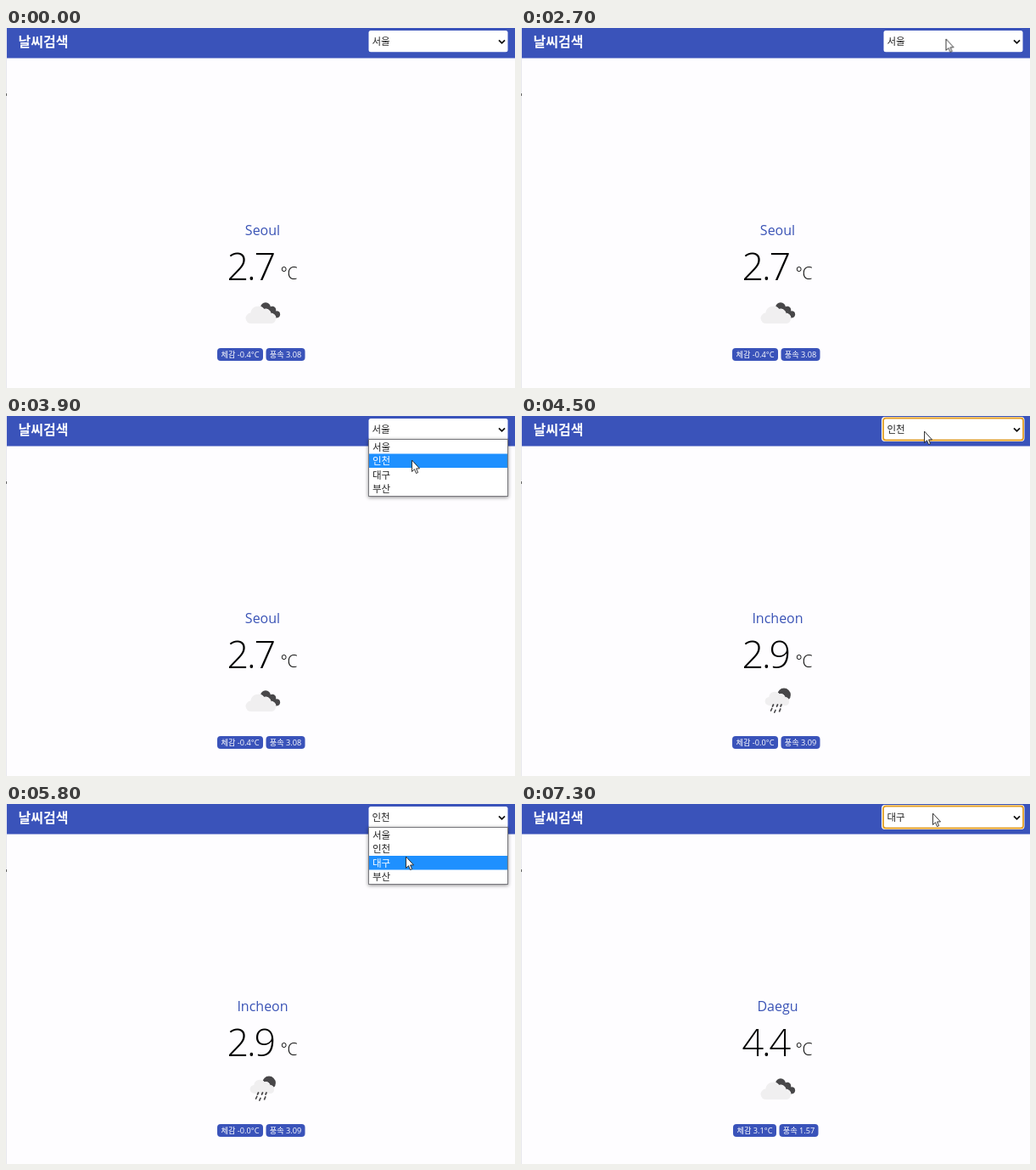
Animation, 600 px wide and 424 px high, one loop 8 s. Source, as an HTML page:

```html
<!DOCTYPE html>
<html lang="ko">
<head>
<meta charset="utf-8">
<title>날씨검색</title>
<style>
  html, body { margin: 0; width: 100%; height: 100%; overflow: hidden; background: #fefdff; }
  svg { display: block; width: 600px; height: 424px; }
  text { font-family: "Open Sans", "Noto Sans CJK KR", "Noto Sans CJK", sans-serif; }

  .title { font-size: 16px; font-weight: 700; fill: #fff; }
  .field { font-size: 11.5px; fill: #222; }
  .on { fill: #fff; }
  .city { font-size: 16px; fill: #3a53b6; text-anchor: middle; }
  .temp { font-size: 45px; font-weight: 350; letter-spacing: -2.2px; }
  .unit { font-size: 19.5px; font-weight: 350; letter-spacing: -.4px; }
  .chip { font-size: 9.2px; fill: #fff; text-anchor: middle; }
  .popup { filter: drop-shadow(0 1px 2px rgba(0, 0, 0, .45)); }

  /* Everything shares one 8 s clock; switches are hard cuts. */
  .anim { animation: 8s step-end infinite; }
  .pick1 { animation-name: pick1; }
  .pick2 { animation-name: pick2; }
  .pick3 { animation-name: pick3; }
  .view1 { animation-name: view1; }
  .view2 { animation-name: view2; }
  .view3 { animation-name: view3; }
  .row1 { animation-name: row1; }
  .row2 { animation-name: row2; }
  .row3 { animation-name: row3; }
  .open { animation-name: open; }
  .focus { animation-name: focus; }
  .cursor { animation-name: cursor; }

  /* selected label */
  @keyframes pick1 { 0% { opacity: 1 } 51.25%, 100% { opacity: 0 } }
  @keyframes pick2 { 0% { opacity: 0 } 51.25% { opacity: 1 } 78.75%, 100% { opacity: 0 } }
  @keyframes pick3 { 0% { opacity: 0 } 78.75%, 100% { opacity: 1 } }

  /* weather panel, a moment after the selection */
  @keyframes view1 { 0% { opacity: 1 } 53.75%, 100% { opacity: 0 } }
  @keyframes view2 { 0% { opacity: 0 } 53.75% { opacity: 1 } 81.25%, 100% { opacity: 0 } }
  @keyframes view3 { 0% { opacity: 0 } 81.25%, 100% { opacity: 1 } }

  /* highlighted option */
  @keyframes row1 { 0% { opacity: 1 } 45%, 100% { opacity: 0 } }
  @keyframes row2 { 0% { opacity: 0 } 45% { opacity: 1 } 71.25%, 100% { opacity: 0 } }
  @keyframes row3 { 0% { opacity: 0 } 71.25%, 100% { opacity: 1 } }

  @keyframes open {
    0% { opacity: 0 } 35% { opacity: 1 } 51.25% { opacity: 0 }
    63.75% { opacity: 1 } 78.75%, 100% { opacity: 0 }
  }
  @keyframes focus {
    0% { opacity: 0 } 51.25% { opacity: 1 }
    63.75% { opacity: 0 } 78.75%, 100% { opacity: 1 }
  }

  /* the pointer advances every 100 ms */
  @keyframes cursor {
    0%     { transform: translate(506px, -24px) }
    22.5%  { transform: translate(506px, -14.5px); animation-timing-function: steps(3) }
    26.25% { transform: translate(502px, 12px) }
    32.5%  { transform: translate(502px, 12px); animation-timing-function: steps(6) }
    40%    { transform: translate(493px, 17px); animation-timing-function: steps(3) }
    43.75% { transform: translate(486px, 34px); animation-timing-function: steps(2) }
    46.25% { transform: translate(480px, 57px); animation-timing-function: steps(2) }
    48.75% { transform: translate(478px, 52px) }
    50%    { transform: translate(478px, 52px); animation-timing-function: steps(5) }
    56.25% { transform: translate(475px, 18px) }
    66.25% { transform: translate(475px, 18px); animation-timing-function: steps(5) }
    72.5%  { transform: translate(471px, 62px) }
    76.25% { transform: translate(467px, 64px) }
    77.5%  { transform: translate(467px, 64px); animation-timing-function: steps(9) }
    88.75% { transform: translate(478px, 20px); animation-timing-function: steps(2) }
    91.25%, 100% { transform: translate(485px, 11px) }
  }
</style>
</head>
<body>
<svg viewBox="0 0 600 424">
  <defs>
    <path id="cloud" d="M289 348a6.2 6.2 0 0 1-.6-12.4A8.6 8.6 0 0 1 304 331.500A6 6 0 0 1 312 336.200A6 6 0 0 1 313.500 348Z"
          fill="#f0eff0" stroke="#fefdff" stroke-width="1.2" paint-order="stroke"/>
    <g id="cloudy">
      <g fill="#484749">
        <circle cx="306" cy="329.200" r="6"/>
        <circle cx="314" cy="332" r="4.300"/>
        <circle cx="319" cy="337.300" r="4.100"/>
        <path d="M306 330h9l4 11.400h-10z"/>
      </g>
      <use href="#cloud"/>
    </g>
    <g id="rainy">
      <circle cx="310" cy="328.500" r="7.900" fill="#484749"/>
      <use href="#cloud" transform="translate(61.600 62.500) scale(.8)"/>
      <path d="M297.500 340l-1 2M302.500 340l-1 2M307 340l-1 2M295.800 344.500l-1.200 2.500M300 346.500l-1.200 2.500M305.800 345l-1.200 2.800"
            stroke="#484749" stroke-width="1.700" stroke-linecap="round"/>
    </g>
  </defs>

  <rect width="600" height="424" fill="#fefdff"/>
  <rect width="1" height="424" fill="#e8e8ee"/>
  <rect y="77" width="1" height="3" fill="#666"/>
  <rect x="1" width="599" height="35.500" fill="#3a53ba"/>
  <text class="title" x="14.500" y="22.300">날씨검색</text>

  <rect class="anim focus" x="425" y="1" width="168.500" height="29" rx="4" fill="#fff"/>
  <rect x="427.500" y="3" width="164" height="25.300" rx="2.500" fill="#fff"/>
  <rect class="anim focus" x="427" y="2.500" width="165" height="26" rx="3" fill="none" stroke="#e5a024" stroke-width="1.800"/>
  <g class="field">
    <text class="anim pick1" x="431.500" y="20">서울</text>
    <text class="anim pick2" x="431.500" y="20">인천</text>
    <text class="anim pick3" x="431.500" y="20">대구</text>
  </g>
  <path d="M581 14.300l3.500 3.500 3.500-3.500" fill="none" stroke="#111" stroke-width="1.800"/>

  <g class="anim view1">
    <text class="city" x="302.500" y="244">Seoul</text>
    <text class="temp" x="260.500" y="296.500">2.7</text>
    <use href="#cloudy"/>
    <g fill="#3a53ba">
      <rect x="249" y="377" width="54" height="15" rx="4"/>
      <rect x="306.500" y="377" width="46" height="15" rx="4"/>
    </g>
    <text class="chip" x="276" y="388">체감 -0.4°C</text>
    <text class="chip" x="329.500" y="388">풍속 3.08</text>
  </g>

  <g class="anim view2">
    <text class="city" x="302.500" y="244">Incheon</text>
    <text class="temp" x="260.500" y="296.500">2.9</text>
    <use href="#rainy"/>
    <g fill="#3a53ba">
      <rect x="249" y="377" width="54" height="15" rx="4"/>
      <rect x="306.500" y="377" width="46" height="15" rx="4"/>
    </g>
    <text class="chip" x="276" y="388">체감 -0.0°C</text>
    <text class="chip" x="329.500" y="388">풍속 3.09</text>
  </g>

  <g class="anim view3">
    <text class="city" x="302.500" y="244">Daegu</text>
    <text class="temp" x="260.500" y="296.500">4.4</text>
    <use href="#cloudy"/>
    <g fill="#3a53ba">
      <rect x="250" y="377" width="51" height="15" rx="4"/>
      <rect x="304.500" y="377" width="46" height="15" rx="4"/>
    </g>
    <text class="chip" x="275.500" y="388">체감 3.1°C</text>
    <text class="chip" x="327.500" y="388">풍속 1.57</text>
  </g>
  <text class="unit" x="323.500" y="296">°C</text>

  <g class="anim open">
    <rect class="popup" x="427.500" y="27.500" width="164" height="67" fill="#fff" stroke="#77777c"/>
    <g class="field">
      <text x="432" y="40.500">서울</text>
      <text x="432" y="57">인천</text>
      <text x="432" y="73.500">대구</text>
      <text x="432" y="90">부산</text>
    </g>
    <g class="anim row1">
      <rect x="428" y="28" width="163" height="16.500" fill="#1e90ff"/>
      <text class="field on" x="432" y="40.500">서울</text>
    </g>
    <g class="anim row2">
      <rect x="428" y="44.500" width="163" height="16.500" fill="#1e90ff"/>
      <text class="field on" x="432" y="57">인천</text>
    </g>
    <g class="anim row3">
      <rect x="428" y="61" width="163" height="16.500" fill="#1e90ff"/>
      <text class="field on" x="432" y="73.500">대구</text>
    </g>
  </g>

  <path class="anim cursor" d="M.5 0V13.500L3.500 10.700 5.500 15.500 7.600 14.600 5.600 9.900H9.500Z"
        fill="#fff" stroke="#222" stroke-width=".9" stroke-linejoin="round"/>
</svg>
</body>
</html>
```
